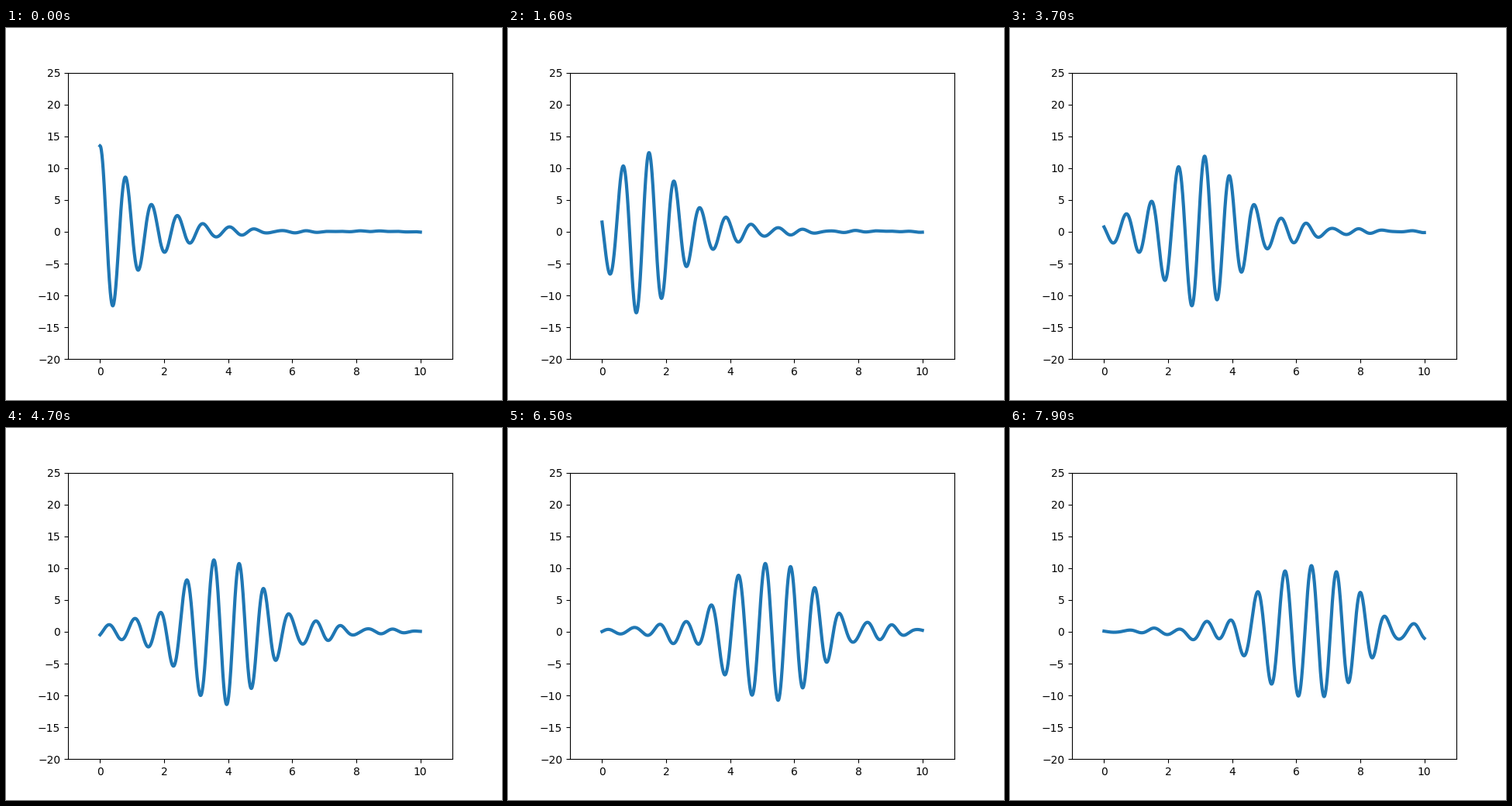
Recreate the animation shown at these times as a matplotlib script. Size 640 px wide and 480 px high, loop 8000 ms.

```python
import matplotlib.pyplot as plt
import numpy as np
from matplotlib.animation import FuncAnimation

FRAMES = 80
INTERVAL = 100
TIME_STEP = 0.01042

# Free-particle packet: Lorentzian energy spectrum, E = k**2 / 2
CENTER, HALF_WIDTH = 30, 6
energy = np.linspace(0, 2 * CENTER, 50)
wave_number = np.sqrt(2 * energy)
weight = 1 / (1 + ((energy - CENTER) / HALF_WIDTH) ** 2)

x = np.linspace(0, 10, 1000)
spatial_phase = np.outer(x, wave_number)


def packet(t):
    return np.cos(spatial_phase - energy * t) @ weight


fig = plt.figure(figsize=(6.4, 4.8), dpi=100)
ax = fig.add_subplot(xlim=(-1, 11), ylim=(-20, 25))
line, = ax.plot(x, packet(0), lw=3)


def update(frame):
    line.set_ydata(packet(frame * TIME_STEP))
    return line,


animation = FuncAnimation(fig, update, frames=FRAMES, interval=INTERVAL,
                          repeat=True, repeat_delay=0)
plt.show()
```
